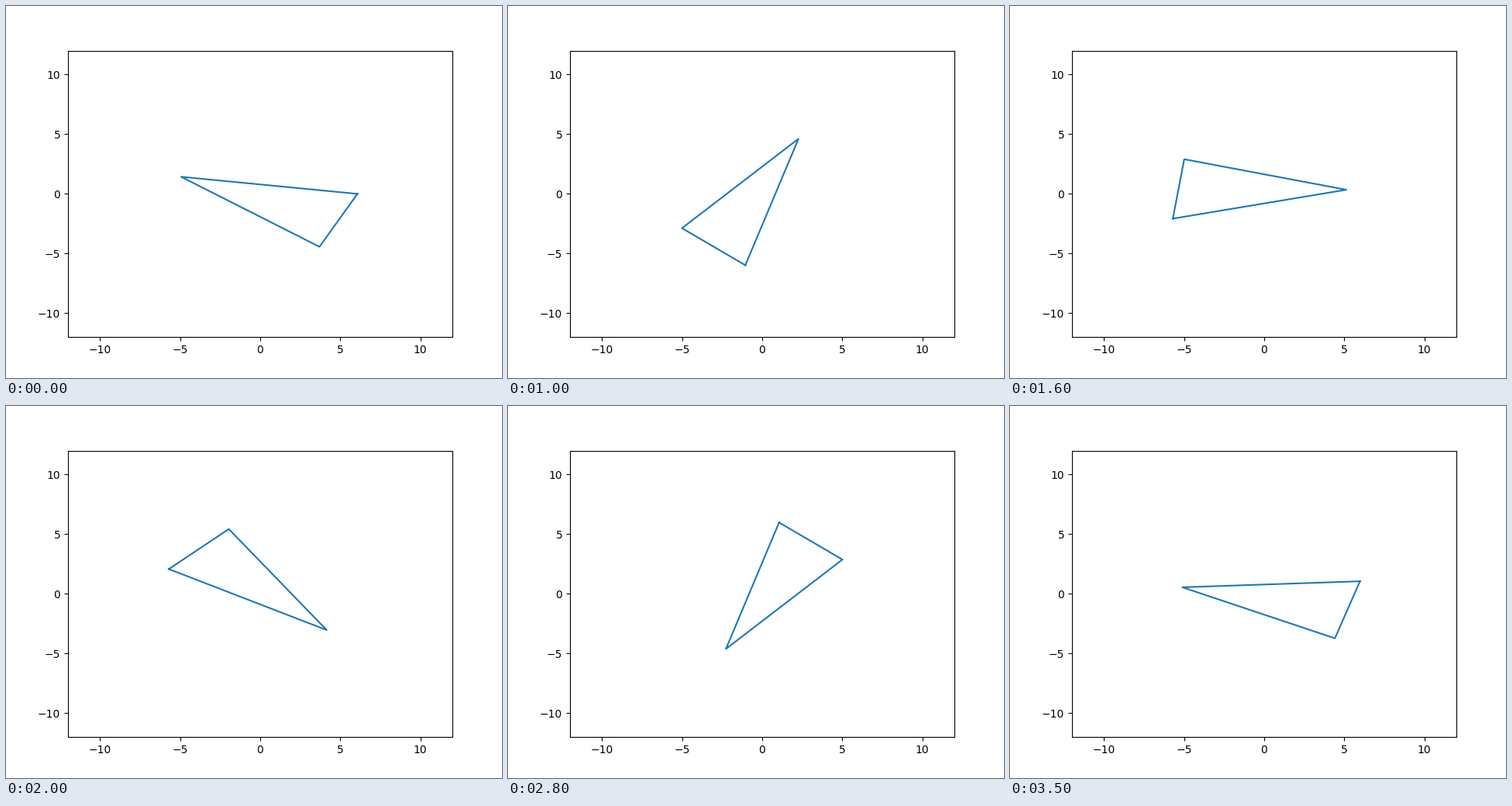
These frames come from a looping animation (640x480 px, 3.6 s). A matplotlib script:

```python
import numpy as np
import matplotlib.pyplot as plt
from matplotlib.animation import FuncAnimation

FRAMES = 36
INTERVAL = 100
LIMIT = 12

# Corners in polar form, with the first repeated to close the outline
RADII = np.array([6.07, 5.14, 5.775, 6.07])
ANGLES = np.radians([0, 163.85, -50.15, 0])

fig, ax = plt.subplots(figsize=(6.4, 4.8), dpi=100)
ax.set_xlim(-LIMIT, LIMIT)
ax.set_ylim(-LIMIT, LIMIT)
line, = ax.plot([], [])


def update(i):
    """Turn the triangle clockwise about the origin, one full turn per loop."""
    a = ANGLES - 2 * np.pi * i / FRAMES
    line.set_data(RADII * np.cos(a), RADII * np.sin(a))
    return line,


anim = FuncAnimation(fig, update, frames=FRAMES, interval=INTERVAL, repeat=True)
plt.show()
```
